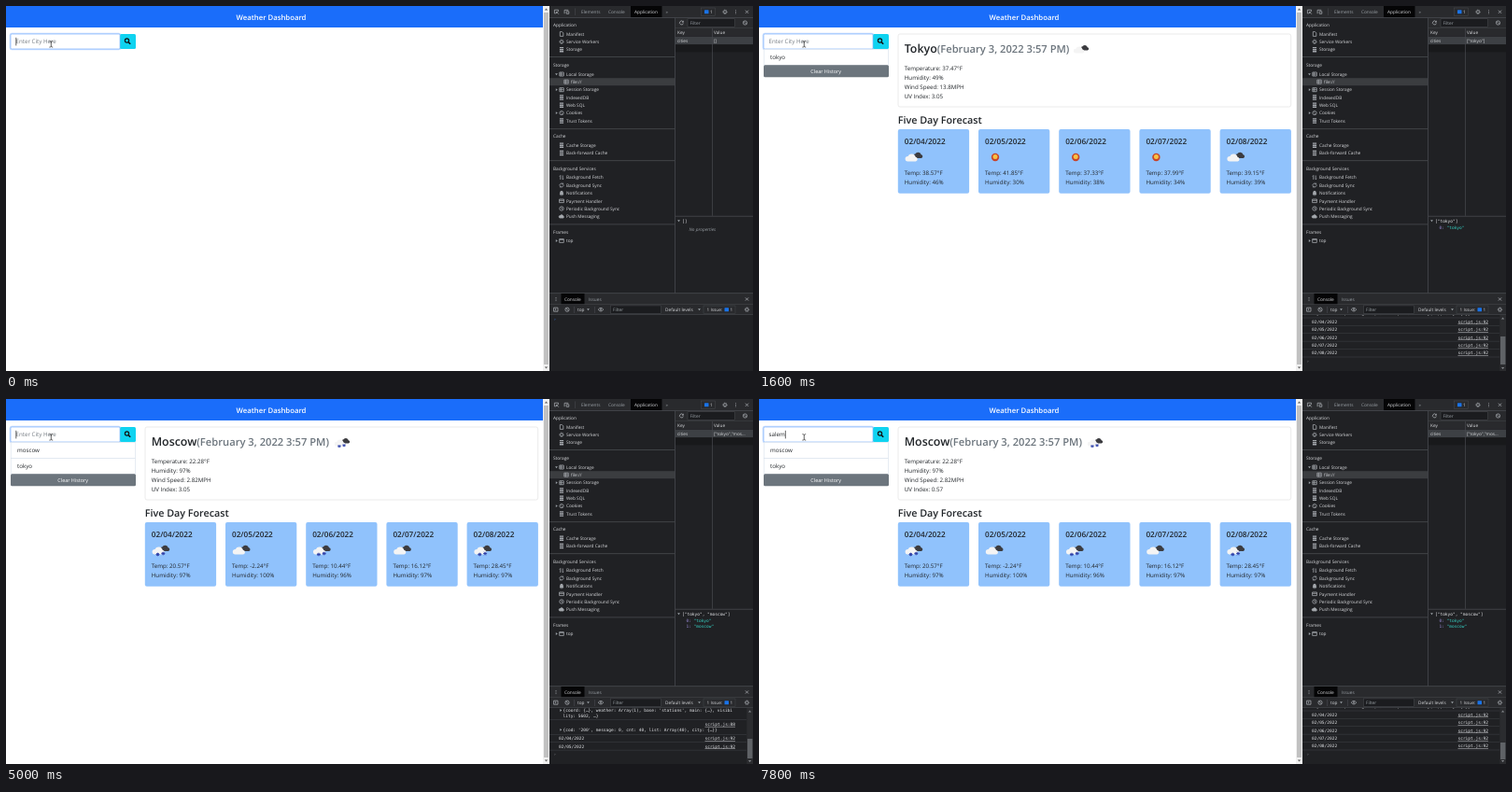
An HTML page that plays this animation: 800 by 391 pixels, repeating every 8 s.

```html
<!DOCTYPE html>
<html lang="en">
<head>
<meta charset="utf-8">
<title>Weather Dashboard</title>
<style>
html, body { margin: 0; width: 100%; height: 100%; overflow: hidden; background: #fff; }
svg { display: block; width: 100vw; height: 100vh; }
text { font-family: "Open Sans", "Noto Sans", sans-serif; font-size: 6.2px; fill: #212529; text-rendering: geometricPrecision; white-space: pre; }
.semi { font-weight: 600; }
.dev { font-size: 4.75px; fill: #d5d7da; }
.dim { fill: #9aa0a6; }
.mono { font: 4.5px "DejaVu Sans Mono", "Liberation Mono", monospace; fill: #e3e5e8; }
.icon { fill: none; stroke: #a4a8ad; stroke-width: .8; }
</style>
</head>
<body>
<svg viewBox="0 0 800 391" preserveAspectRatio="none">
  <defs>
    <path id="cloud" d="M3 9.5a2.8 2.8 0 0 1 .2-5.6 4.4 4.4 0 0 1 8.2.9 2.4 2.4 0 0 1 .2 4.7z"/>
    <g id="cloudy">
      <use href="#cloud" transform="translate(8.5 .5) scale(.78)" fill="#3c3c40"/>
      <use href="#cloud" y="2" fill="#f4f4f4"/>
    </g>
    <g id="snow">
      <use href="#cloudy"/>
      <path d="M4.2 11.5h4M6.2 9.7v3.6M4.8 10.1l2.8 2.8M7.6 10.1l-2.8 2.8M10 10.5h4M12 8.7v3.6M10.6 9.1l2.8 2.8M13.4 9.1l-2.8 2.8" stroke="#2c3fa8" stroke-width=".9"/>
    </g>
    <g id="sun"><circle cx="10.5" cy="7" r="4.2" fill="#c8452a"/><circle cx="10.5" cy="6.6" r="2.5" fill="#f7c244"/></g>
    <clipPath id="logArea"><rect x="582" y="331" width="218" height="60"/></clipPath>
  </defs>
  <g id="page"></g>
  <g id="devtools"></g>
  <g id="live"></g>
  <path id="pointer" d="M46.4 37.7q1.6 0 1.9.8q.3-.8 1.9-.8M48.3 38.2v5.4M46.4 44.1q1.6 0 1.9-.8q.3.8 1.9.8" fill="none" stroke="#222" stroke-width=".7"/>
</svg>
<script>
const LOOP = 8000, STEP = 200;
const $ = id => document.getElementById(id);
const esc = s => String(s).replace(/&/g, '&amp;').replace(/</g, '&lt;');
const text = (x, y, s, cls = '', attrs = '') => `<text x="${x}" y="${y}" class="${cls}" ${attrs}>${esc(s)}</text>`;
const rect = (x, y, w, h, fill, attrs = '') => `<rect x="${x}" y="${y}" width="${w}" height="${h}" fill="${fill}" ${attrs}/>`;
const path = (d, attrs = 'class="icon"') => `<path d="${d}" ${attrs}/>`;
const use = (id, x, y, scale = 1) => `<use href="#${id}" transform="translate(${x} ${y}) scale(${scale})"/>`;
const size = n => `style="font-size:${n}px"`;
const rule = (x, y, w, h = .8) => rect(x, y, w, h, '#484a4f');

// Small icons, drawn around their centre
const glyphs = {
  db: '<path d="M-2.1-2.1h4.2M-2.1 0h4.2M-2.1 2.1h4.2" stroke-width="1.4"/>',
  file: '<path d="M-1.7-2.4h2.2l1.3 1.3v3.5h-3.5z"/>',
  gear: '<circle r="1.5"/><circle r="2.2" stroke-dasharray=".9 .83"/>',
  grid: '<path d="M-2.2-2h4.4v4h-4.4zM-2.2 0h4.4M-.6-2v4"/>',
  cookie: '<circle r="2.1"/><path d="M-.8-.6h.8M.2.8h.8"/>',
  fetch: '<path d="M-1.2 2.2v-4.4l-1 1M1.2-2.2v4.4l1-1"/>',
  sync: '<path d="M-2 .6a2.1 2.1 0 0 1 3.4-2.1M2-.6a2.1 2.1 0 0 1-3.4 2.1M.4-1.2h1.2v-1.2M-.4 1.2h-1.2v1.2"/>',
  bell: '<path d="M-2 1.5h4l-.6-.8v-1.5a1.4 1.4 0 0 0-2.8 0v1.5zM-.5 2.3h1" fill="#a4a8ad"/>',
  card: '<path d="M-2.4-1.8h4.8v3.6h-4.8zM-2.4-.5h4.8"/>',
  clock: '<circle r="2.2"/><path d="M0-1.3v1.3l1 .7"/>',
  cloud: '<path d="M-1.6 1.5a1.2 1.2 0 0 1 0-2.4 1.8 1.8 0 0 1 3.3.5 1 1 0 0 1 0 1.9z" fill="#a4a8ad"/>',
  frame: '<path d="M-2.3-1.9h4.6v3.8h-4.6zM-2.3-1.2h4.6"/>',
  ban: '<circle r="2.1"/><path d="M-1.5-1.5l3 3"/>',
  close: '<path d="M-1.6-1.6l3.2 3.2M1.6-1.6l-3.2 3.2"/>',
  dots: '<path d="M0-2v.9M0-.4v.9M0 1.2v.9"/>',
  reload: '<path d="M1.6-1.2a2 2 0 1 0 .3 1.7M1.9-2.2v1.5h-1.5"/>',
  eye: '<path d="M-2.8 0q2.8-3.6 5.6 0q-2.8 3.6-5.6 0"/><circle r=".7"/>',
  inspect: '<path d="M2-.5v-1.6h-4.1v3.7h1.5M0 0l2.4 2.4M0 0v1.7M0 0h1.7"/>',
  device: '<path d="M-2.4 1.9v-3.9h4.2M-.3-.5h2.6v2.5h-2.6z"/>',
  panel: '<path d="M-2.2-2h4.4v4h-4.4zM-.9-1l1.2 1-1.2 1"/>',
};
const glyph = (name, x, y) => `<g class="icon" transform="translate(${x} ${y})">${glyphs[name]}</g>`;
const closed = (x, y) => path(`M${x - .7} ${y - 1.4}l2 1.4-2 1.4z`, 'fill="#9aa0a6"');
const opened = (x, y) => path(`M${x - 1.4} ${y - .8}h2.8l-1.4 2z`, 'fill="#9aa0a6"');
const issues = (x, y) => rect(x, y - 2.3, 4.5, 4, '#1a73e8', 'rx=".5"') + text(x + 6, y + 1.6, '1', 'dev');

function drawPage() {
  return rect(0, 0, 582, 391, '#fff') + rect(0, 0, 575, 23, '#1a6dfa')
    + text(284, 14.6, 'Weather Dashboard', 'semi', 'text-anchor="middle" style="font-size:7.75px;fill:#fff"')
    + rect(575, 0, 7, 391, '#f1f1f1') + rect(576, 7, 5, 377, '#c1c1c1')
    + path('M576.8 4.5l1.7-2 1.7 2zM576.8 386.5l1.7 2 1.7-2z', 'fill="#606060"')
    + rect(3.7, 28.8, 119.5, 18.4, '#c5dcfe', 'rx="2.5"')
    + rect(122, 30, 17, 16, '#0fd3f0', 'rx="1.5"')
    + rect(5, 30, 117, 16, '#fff', 'rx="1.5" stroke="#86b7fe" stroke-width=".7"')
    + '<circle cx="129.5" cy="37" r="2.1" fill="none" stroke="#111" stroke-width="1.2"/>'
    + path('M131 38.6l2.2 2.2', 'stroke="#111" stroke-width="1.5"');
}

const sidebar = [
  [20, 'Application'], [30, 'Manifest', 'file'], [38.3, 'Service Workers', 'gear'], [46.7, 'Storage', 'db'],
  [63, 'Storage'], [73, 'Local Storage', 'grid', opened], [81.2, 'file://', 'grid'], [89.7, 'Session Storage', 'grid', closed],
  [98, 'IndexedDB', 'db'], [106.2, 'Web SQL', 'db'], [114.6, 'Cookies', 'cookie', closed], [123, 'Trust Tokens', 'db'],
  [139.5, 'Cache'], [149.2, 'Cache Storage', 'db'], [157.5, 'Back-forward Cache', 'db'],
  [174, 'Background Services'], [183.7, 'Background Fetch', 'fetch'], [192, 'Background Sync', 'sync'],
  [200.5, 'Notifications', 'bell'], [208.8, 'Payment Handler', 'card'], [217, 'Periodic Background Sync', 'clock'],
  [225.5, 'Push Messaging', 'cloud'], [242, 'Frames'], [251.5, 'top', 'frame', closed],
];

function drawDevtools() {
  const rows = sidebar.map(([y, label, icon, arrow]) => {
    const x = label === 'file://' ? 605 : icon ? 600 : 586;
    return (arrow ? arrow(589.5, y) : '') + (icon ? glyph(icon, x - 5, y) : '') + text(x, y + 1.7, label, 'dev');
  }).join('');
  const field = (x, y, w) => rect(x, y, w, 8.6, '#1b1c1f', 'stroke="#45474b" stroke-width=".6"') + text(x + 2.5, y + 6, 'Filter', 'dev dim');
  return rect(582, 0, 218, 391, '#202124')
    + rect(582, 0, 218, 12.5, '#292a2d') + rect(669, 0, 33.5, 12.5, '#050506') + rule(582, 12.2, 218)
    + glyph('inspect', 589.5, 6.3) + glyph('device', 600.5, 6.3) + rule(609, 2.5, .6, 7.5)
    + text(616, 8.2, 'Elements', 'dev dim') + text(645, 8.2, 'Console', 'dev dim')
    + text(673, 8.2, 'Application', 'dev') + text(706.5, 8.2, '»', 'dev dim')
    + rect(744.5, 2, 15, 8.5, 'none', 'stroke="#484a4f" stroke-width=".5"') + issues(748, 6.5)
    + glyph('gear', 770, 6.3) + glyph('dots', 781.5, 6.3) + glyph('close', 793.5, 6.3)
    + rect(582, 77.2, 134, 8, '#3b3d40') + rows
    + [54, 131.3, 165.3, 233.5].map(y => rule(582, y, 134)).join('')
    + rule(716, 12.5, .8, 295.5)
    + rect(717, 13, 83, 10.5, '#292a2d') + glyph('reload', 723.5, 18) + field(730, 13.7, 50.5) + glyph('ban', 791.5, 18)
    + rect(717, 24, 83, 8.8, '#292a2d') + rule(717, 23.4, 83, .5)
    + text(719, 30, 'Key', 'dev') + text(758, 30, 'Value', 'dev')
    + rect(717, 33, 83, 8.3, '#3d4044') + text(719, 38.8, 'cities', 'dev')
    + rect(717, 41.3, 83, 8, '#18191b') + rule(756, 24, .7, 200.8) + rule(717, 224.8, 83)
    + opened(720.5, 230)
    + rect(582, 307.5, 218, 12.5, '#292a2d') + rule(582, 307.3, 218) + rect(594.5, 308, 25, 11.5, '#050506') + rule(582, 319.5, 218, .6)
    + glyph('dots', 589, 314) + text(598, 315.8, 'Console', 'dev') + text(624, 315.8, 'Issues', 'dev dim') + glyph('close', 793.5, 314)
    + rect(582, 320, 218, 10.5, '#292a2d') + rule(582, 330.3, 218, .6)
    + glyph('panel', 588.8, 325.2) + glyph('ban', 601, 325.2) + rule(608, 322, .6, 7)
    + text(612, 327, 'top', 'dev') + opened(623.5, 325) + rule(630, 322, .6, 7) + glyph('eye', 637, 325.2)
    + field(647.5, 320.9, 54) + text(706, 327, 'Default levels', 'dev') + opened(742.5, 325)
    + rect(747, 321, 34, 8.6, 'none', 'stroke="#45474b" stroke-width=".5"') + text(750.5, 327, '1 Issue:', 'dev') + issues(769.5, 325.5)
    + glyph('gear', 793.5, 325.2);
}

const days = ['04', '05', '06', '07', '08'].map(d => `02/${d}/2022`);
const cities = {
  tokyo: {
    title: 'Tokyo', icon: 'cloudy', iconX: 336.5, now: ['37.47', 49, '13.8'],
    forecast: [['cloudy', '38.57', 46], ['sun', '41.85', 30], ['sun', '37.33', 38], ['sun', '37.99', 34], ['cloudy', '39.15', 39]],
  },
  moscow: {
    title: 'Moscow', icon: 'snow', iconX: 351.5, now: ['22.28', 97, '2.82'],
    forecast: [['snow', '20.57', 97], ['cloudy', '-2.24', 100], ['snow', '10.44', 96], ['cloudy', '16.12', 97], ['snow', '28.45', 97]],
  },
};

const keys = [[0, ''], [200, 't'], [400, 'to'], [600, 'toky'], [800, 'tokyo'], [1000, ''],
  [3800, 'm'], [4000, 'mo'], [4200, 'mosc'], [4400, 'mosco'], [4600, 'moscow'], [4800, ''],
  [6800, 's'], [7000, 'sa'], [7200, 'sal'], [7400, 'sale'], [7600, 'salem']];

function drawInput(t) {
  const [since, typed] = keys.filter(k => k[0] <= t).pop();
  const caret = (t - since) % 1000 < 500;
  return text(10.5, 40.1, typed || 'Enter City Here', '', typed ? 'id="typed"' : 'style="fill:#737a81"')
    + (caret ? '<rect id="caret" x="10.5" y="33.8" width=".7" height="8.6" fill="#222"/>' : '');
}

function drawHistory(names) {
  if (!names.length) return '';
  const end = 46.3 + 17 * names.length;
  return [...names].reverse().map((name, i) =>
    rect(5.2, 46.3 + 17 * i, 133.3, 17, '#fff', 'stroke="#d5dfec" stroke-width=".6"') + text(12, 57 + 17 * i, name)).join('')
    + rect(5, end, 134, 13, '#6c757d', 'rx="1.5"')
    + text(71.7, end + 8.3, 'Clear History', '', 'text-anchor="middle" style="font-size:5.45px;fill:#fff"');
}

function drawWeather(city, uv, ready) {
  const [temp, humidity, wind] = city.now;
  const lines = [`Temperature: ${temp}°F`, `Humidity: ${humidity}%`, `Wind Speed: ${wind}MPH`, `UV Index: ${uv}`];
  const card = (x, w, h, title) => rect(x, 132, w, h, '#90c2fc', 'rx="2"') + text(x + 7, 147.5, title, 'semi', size(8.2));
  let out = rect(149, 30, 420.7, 78, '#fff', 'rx="2" stroke="#dedede" stroke-width=".6"')
    + `<text x="155.7" y="50.2" class="semi" ${size(12.4)}>${city.title}<tspan style="font-size:11.2px;fill:#6c757d">(February 3, 2022 3:57 PM)</tspan></text>`
    + use(city.icon, city.iconX, 40.5, .88)
    + lines.map((line, i) => text(155.8, 68.5 + 10 * i, line)).join('')
    + text(148.7, 126.2, 'Five Day Forecast', 'semi', size(10.75));
  if (!ready) {
    return out + card(149, 62, 64.3, 'Date')
      + '<circle cx="159" cy="157.5" r="2" fill="none" stroke="#212529" stroke-width="1.6"/><path d="M159 154.3v6.4M155.8 157.5h6.4M156.8 155.3l4.4 4.4M161.2 155.3l-4.4 4.4" stroke="#212529" stroke-width=".9"/>'
      + text(155.8, 170.2, 'Temp:') + text(155.8, 186.8, 'Humidity:');
  }
  return out + city.forecast.map(([icon, high, damp], i) => {
    const x = 148.8 + 86.2 * i;
    return card(x, 76.3, 68.8, days[i]) + use(icon, x + 7.5, 155)
      + text(x + 7, 181, `Temp: ${high}°F`) + text(x + 7, 191, `Humidity: ${damp}%`);
  }).join('');
}

function drawStorage(names) {
  const quoted = names.map(n => `"${n}"`);
  const value = names.length > 1 ? '["tokyo","mos…' : `[${quoted}]`;
  return text(758, 38.8, value, 'dev')
    + text(724, 231.7, `[${quoted.join(', ')}]`, 'mono', 'font-weight="600"')
    + (names.length
      ? quoted.map((q, i) => text(728.5, 238.8 + 6.6 * i, i + ':', 'mono', 'style="fill:#9a8ad8"')
        + text(736.5, 238.8 + 6.6 * i, q, 'mono', 'style="fill:#35d4c7"')).join('')
      : text(731.5, 240.7, 'No properties', 'dev dim', 'font-style="italic"'));
}

function drawLog(t) {
  const prompt = y => text(586.5, y + 1.6, '›', 'mono', `style="fill:${t < 1000 ? '#3b82f6' : '#858a90'}"`);
  if (t < 1600) return prompt(335);
  const link = (y, line) => text(781, y + 1.6, 'script.js:' + line, 'mono dim', 'text-anchor="end" text-decoration="underline"');
  const dateRow = (date, y) => text(592, y + 1.6, date, 'mono') + link(y, 92) + rule(582, y + 4, 211, .4);
  const object = (y, s) => text(596.5, y + 1.6, s, 'mono', 'font-style="italic"');
  const partial = t === 5000;
  const body = partial
    ? closed(594, 333.5) + object(333.5, "{coord: {…}, weather: Array(1), base: 'stations', main: {…}, visibi")
      + object(339.5, 'lity: 5602, …}') + rule(582, 343.5, 211, .4) + link(348.3, 88)
      + closed(594, 354.3) + object(354.3, "{cod: '200', message: 0, cnt: 40, list: Array(40), city: {…}}")
      + rule(582, 359, 211, .4) + days.slice(0, 2).map((d, i) => dateRow(d, 363.5 + 8.4 * i)).join('')
    : object(329.7, "{cod: '200', message: 0, cnt: 40, list: Array(40), city: {…}}") + rule(582, 333.8, 211, .4)
      + days.map((d, i) => dateRow(d, 338 + 8.45 * i)).join('');
  const thumb = t < 5000 ? [354, 30] : partial ? [364, 21] : [368, 18];
  return body + prompt(380.3) + rect(793.3, 331, 6.7, 60, '#2b2c2f') + rect(794, thumb[0], 5.4, thumb[1], '#5f6266')
    + path('M795 335.5l1.6-2 1.6 2zM795 387l1.6 2 1.6-2z', 'fill="#85888c"');
}

function render(t) {
  const names = ['tokyo', 'moscow'].slice(0, t < 1000 ? 0 : t < 4800 ? 1 : 2);
  const uv = t < 1600 ? '' : t < 5200 ? '3.05' : '0.57';
  $('live').innerHTML = drawInput(t) + drawHistory(names)
    + (t < 1400 ? '' : drawWeather(t < 5000 ? cities.tokyo : cities.moscow, uv, t >= 1600))
    + drawStorage(names) + `<g clip-path="url(#logArea)">${drawLog(t)}</g>`;
  const typed = $('typed'), caret = $('caret');
  if (typed && caret) caret.setAttribute('x', 10.7 + typed.getComputedTextLength());
}

$('page').innerHTML = drawPage();
$('devtools').innerHTML = drawDevtools();
let shown = -1;
const start = performance.now();
function tick() {
  const t = Math.floor((performance.now() - start) % LOOP / STEP) * STEP;
  if (t !== shown) render(shown = t);
  requestAnimationFrame(tick);
}
tick();
</script>
</body>
</html>
```
